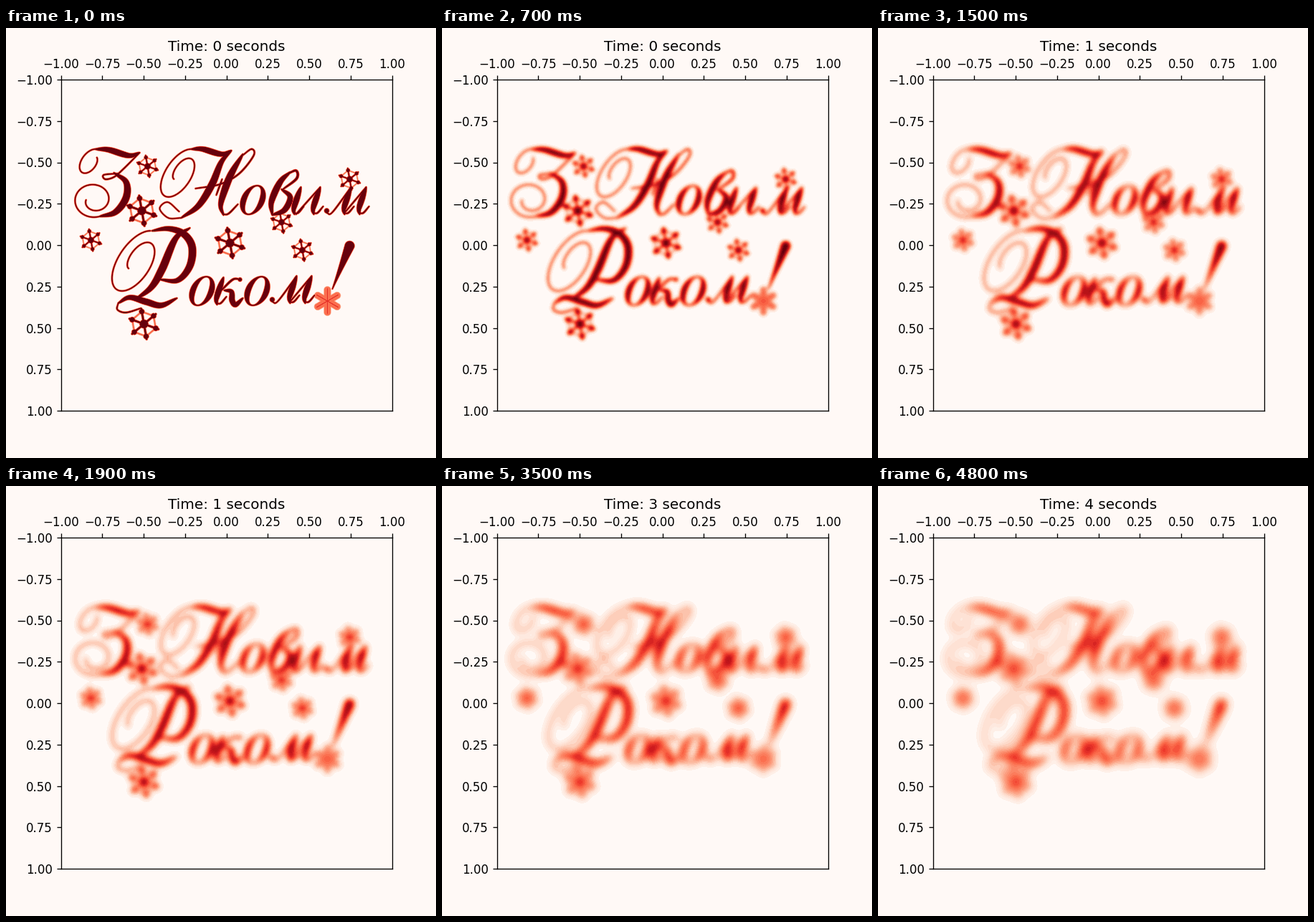
Animation of 600x600 px, one loop 4.9 s. Source, as a matplotlib script:

```python
import numpy as np
import matplotlib.pyplot as plt
from matplotlib.animation import FuncAnimation
from matplotlib.colors import ListedColormap

N = 462                      # grid cells, one per pixel of the axes
LEFT, TOP = 76.5, 72         # stage position of the axes corner
FRAMES, STEP = 49, 100
SPREAD = 3.15                # blur radius in pixels after one second
HAIR = 1.15                  # radius of the thinnest line
PAPER = (1, 0.977, 0.965, 1)

heat = np.zeros((N, N))


def dab(x, y, r, level=1.0):
    """Stamp one soft-edged round dot, keeping the stronger ink."""
    x, y = x - LEFT - 0.5, y - TOP - 0.5
    x0, x1 = int(x - r - 1), int(x + r + 3)
    y0, y1 = int(y - r - 1), int(y + r + 3)
    yy, xx = np.ogrid[y0:y1, x0:x1]
    ink = level * np.clip((r + 0.8 - np.hypot(xx - x, yy - y)) / 1.6, 0, 1)
    box = heat[y0:y1, x0:x1]
    np.maximum(box, ink, out=box)


def line(a, b, r, level=1.0):
    a, b = np.array(a), np.array(b)
    for t in np.linspace(0, 1, int(2 * np.hypot(*(b - a))) + 2):
        dab(*(a + (b - a) * t), r, level)


def pen(swell, *points):
    """Smooth curve through the points, a hairline swelling to its middle."""
    p = np.array(points, float)
    p = np.vstack([2 * p[0] - p[1], p, 2 * p[-1] - p[-2]])
    parts = []
    for a, b, c, d in zip(p, p[1:], p[2:], p[3:]):
        t = np.linspace(0, 1, int(2.2 * np.hypot(*(c - b))) + 2)[:, None]
        parts.append(0.5 * (2 * b + (c - a) * t
                            + (2 * a - 5 * b + 4 * c - d) * t**2
                            + (3 * b - a - 3 * c + d) * t**3))
    path = np.vstack(parts)
    u = np.linspace(0, 1, len(path))
    radius = HAIR + swell * np.sin(np.pi * u).clip(0) ** 0.75
    for (x, y), r in zip(path, radius):
        dab(x, y, r)


def swirl(x, y, rx, ry, start, stop, slant=0.45, shrink=0.7, fat=0):
    """Slanted elliptic spiral, heavier on its sides when fat."""
    u = np.linspace(0, 1, int(abs(stop - start) * max(rx, ry) / 28))
    a = np.radians(start + (stop - start) * u)
    f = 1 - shrink * u**2
    dx, dy = rx * f * np.cos(a), ry * f * np.sin(a)
    for px, py, r in zip(x + dx - slant * dy, y + dy, HAIR + fat * np.cos(a) ** 2):
        dab(px, py, r)


def stem(x, y):
    """Slanted downstroke of a small letter with its exit flick."""
    pen(3.2, (x, y - 1), (x - 5, y + 13), (x - 10, y + 29), (x - 9, y + 37))
    pen(0.3, (x - 10, y + 35), (x - 4, y + 35), (x + 4, y + 26))


def letter_o(x, y):
    swirl(x, y, 13, 20, 0, 360, slant=0.3, shrink=0, fat=3)


def letter_m(x, y):
    dab(x, y, 3.6)
    pen(0.2, (x, y + 3), (x + 8, y + 2), (x + 34, y - 33))
    stem(x + 34, y - 32)
    pen(0.2, (x + 24, y + 4), (x + 55, y - 33))
    stem(x + 55, y - 32)


def top_line():
    # З
    swirl(117, 187, 14, 18, 270, -35, slant=0.4, shrink=0.4)
    pen(3.3, (124, 169), (143, 170), (171, 178), (186, 174))
    pen(0.2, (186, 174), (163, 197), (150, 208), (138, 211), (136, 205), (156, 203))
    pen(4, (150, 202), (167, 215), (167, 237), (152, 257), (130, 263))
    swirl(122, 240, 27, 24, 70, 540, slant=0, shrink=0.6)
    # Н
    swirl(242, 204, 23, 35, 270, -220)
    pen(3.2, (258, 169), (274, 169), (300, 176), (314, 171))
    pen(4, (314, 171), (300, 187), (287, 218), (268, 248), (244, 265))
    pen(0, (244, 265), (226, 265), (214, 252), (225, 243), (241, 256))
    pen(0.3, (264, 224), (298, 218), (325, 203), (345, 178), (342, 169), (328, 179))
    pen(4, (330, 176), (314, 203), (304, 228), (299, 248), (303, 261))
    pen(0.3, (302, 260), (310, 259), (323, 246))
    pen(0.3, (301, 211), (293, 233))
    letter_o(344, 240)
    # в
    pen(0.8, (386, 225), (405, 210), (404, 199), (390, 205))
    pen(3.6, (396, 201), (382, 215), (370, 242), (371, 261))
    pen(3.2, (384, 225), (396, 236), (388, 254), (371, 261))
    # и
    stem(411, 223)
    pen(0.2, (404, 260), (438, 222))
    stem(438, 223)
    letter_m(447, 255)


def bottom_line():
    # Р
    swirl(181, 327, 29, 44, 270, -220)
    pen(4.3, (203, 283), (226, 280), (247, 287), (259, 305),
        (256, 332), (239, 352), (214, 351))
    pen(4.4, (256, 279), (236, 294), (217, 337), (202, 362), (180, 379))
    pen(3.5, (238, 377), (216, 387), (195, 382), (172, 376), (156, 384))
    pen(0.2, (156, 384), (155, 393), (167, 397), (188, 391))
    letter_o(273, 367)
    # к
    stem(303, 349)
    pen(0.6, (299, 367), (316, 351), (327, 351))
    dab(326, 351, 3)
    pen(3, (304, 366), (314, 368), (315, 380), (320, 386), (330, 377))
    letter_o(350, 367)
    letter_m(371, 379)
    # !
    for u in np.linspace(0, 1, 130):
        dab(479 - 24 * u, 304 + 60 * u, 1 + 6 * (1 - u) ** 1.2)


def spokes(x, y, r, tilt):
    for a in np.radians(tilt + 60 * np.arange(6)):
        yield x + r * np.cos(a), y + r * np.sin(a)


def flake(x, y, size, tilt=20):
    dab(x, y, 0.27 * size)
    rim = list(spokes(x, y, 0.76 * size, tilt))
    for knot, after, tip in zip(rim, rim[1:] + rim[:1],
                                spokes(x, y, 0.93 * size, tilt)):
        line((x, y), tip, 0.07 * size)
        line(knot, after, 0.06 * size, 0.5)
        dab(*knot, 0.17 * size)


def pale_flake(x, y, size):
    for tip in spokes(x, y, 0.78 * size, 30):
        line((x, y), tip, 0.25 * size, 0.47)
    for tip in spokes(x, y, 0.85 * size, 30):
        line((x, y), tip, 1.2, 0.66)


def snow():
    for spot in [(197, 193), (479, 211), (384, 271), (118, 296), (413, 310)]:
        flake(*spot, 16.5)
    for spot in [(189, 255), (312, 300), (192, 413)]:
        flake(*spot, 23)
    pale_flake(448, 381, 20)


top_line()
bottom_line()
snow()

freq = np.fft.fftfreq(N)
k2 = freq[:, None] ** 2 + np.fft.rfftfreq(N)[None, :] ** 2
spectrum = np.fft.rfft2(heat)


def diffuse(t):
    """Heat equation solved in Fourier space."""
    decay = np.exp(-2 * np.pi**2 * SPREAD**2 * t * k2)
    return np.fft.irfft2(spectrum * decay, s=(N, N))


reds = plt.get_cmap("Reds")(np.linspace(0, 1, 28))
reds[0] = PAPER

fig, ax = plt.subplots(figsize=(5, 5), dpi=120, facecolor=PAPER)
image = ax.imshow(heat, cmap=ListedColormap(reds), vmin=0, vmax=1,
                  extent=[-1, 1, 1, -1], interpolation="nearest")
ax.set_xticks(np.linspace(-1, 1, 9))
ax.set_yticks(np.linspace(-1, 1, 9))
ax.xaxis.tick_top()
title = ax.set_title("Time: 0 seconds")


def update(i):
    image.set_data(diffuse(i * STEP / 1000))
    title.set_text(f"Time: {i * STEP // 1000} seconds")
    return image, title


anim = FuncAnimation(fig, update, frames=FRAMES, interval=STEP, repeat=True)
plt.show()
```
